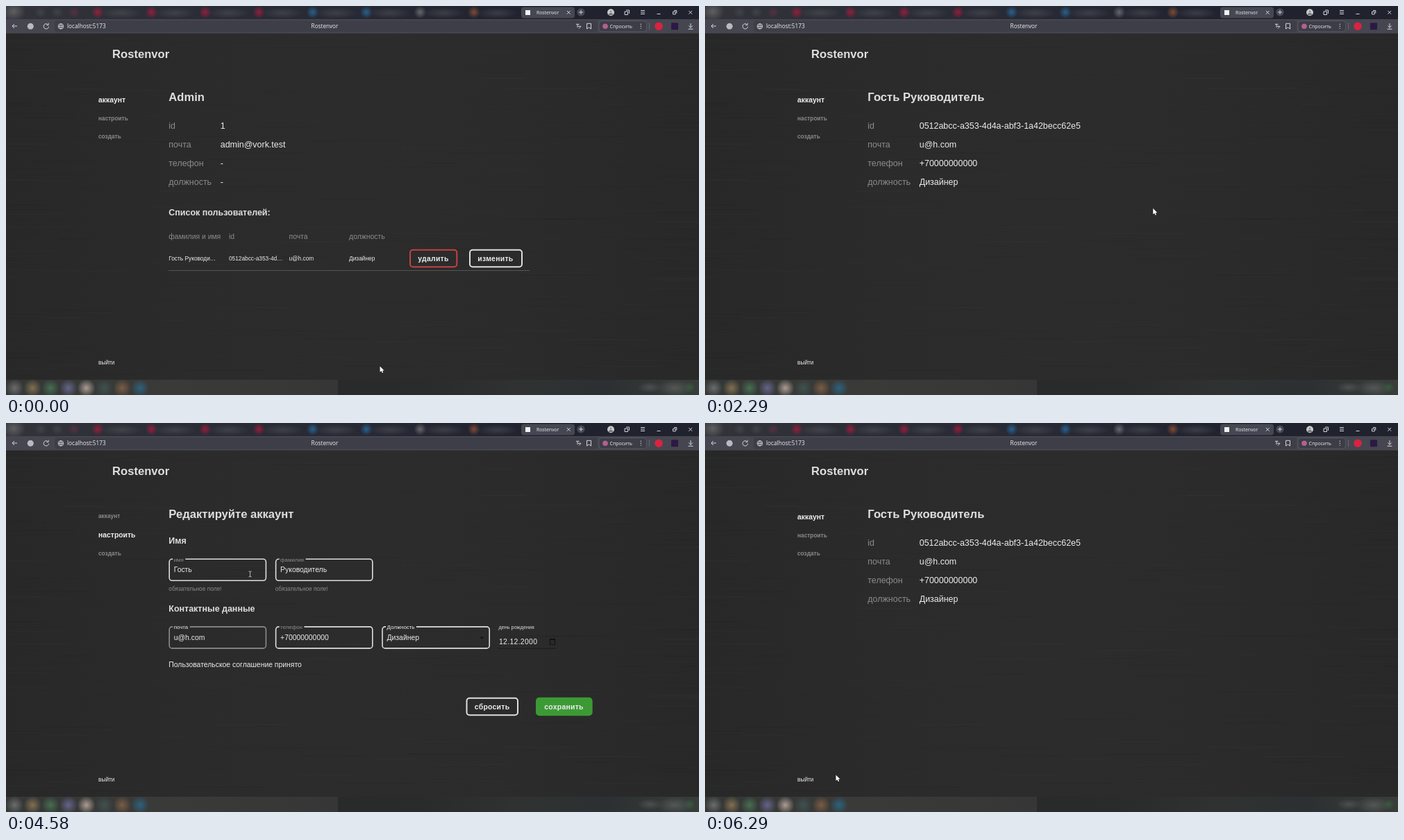
Animation of 998 by 561 pixels, one loop 6390 ms. Source, as an HTML page with a canvas:

```html
<!DOCTYPE html>
<html lang="ru">
<head>
<meta charset="utf-8">
<title>Rostenvor</title>
<style>
html, body { margin: 0; width: 100%; height: 100%; overflow: hidden; background: #2a2a2a; }
canvas { display: block; width: 998px; height: 561px; }
</style>
</head>
<body>
<canvas id="stage" width="998" height="561"></canvas>
<script>
const W = 998, H = 561, LOOP = 6390;
const ctx = document.getElementById('stage').getContext('2d');
const SANS = '"Liberation Sans", Arial, sans-serif';
const UI = '"Open Sans", "Noto Sans", sans-serif';

// Page type scale
const XS = 7.9, S = 8.32, M = 10.4, L = 12.47, XL = 16.63;
const LIGHT = '#dedede', WHITE = '#ececec', GREY = '#8c8c8c', GREEN = '#3c9a35', INK = '#111', ICON = '#d5d6da';
const COL = 234.3, STEP = 153.4;

const APP = 'Rostenvor', FIRST = 'Гость', LAST = 'Руководитель';
const MAIL = 'u@h.com', PHONE = '+70000000000', JOB = 'Дизайнер', ID = '0512abcc-a353-4d4a-abf3-1a42becc62e5';

// Page changes, ms
const LOGIN = 900, ACCOUNT = 2120, EDIT = 2804, AGAIN = 5204, BACK = 5560, FADE = 250;

// Pointer stops: time, x, y
const PATH = [
  [0, 538.5, 519.5], [560, 150, 516], [LOGIN, 150, 516], [1660, 672, 289], [1850, 724, 312], [2090, 724, 312],
  [2950, 154.5, 166.5], [3910, 781, 415], [4580, 352, 218], [AGAIN, 151, 162], [5370, 150, 145],
  [BACK, 149, 135], [6040, 316, 323], [6110, 316, 323], [6220, 157, 506], [6290, 188.5, 507.5], [LOOP, 188.5, 507.5]
];

const ramp = (t, a, b) => Math.min(1, Math.max(0, (t - a) / (b - a)));
const mix = (a, b, k) => a + (b - a) * k;

// Monotone cubic through the stops: the pointer rests wherever it turns
function slope(i, c) {
  if (i < 1 || i > PATH.length - 2) return 0;
  const rate = j => (PATH[j + 1][c] - PATH[j][c]) / (PATH[j + 1][0] - PATH[j][0]);
  const a = rate(i - 1), b = rate(i);
  return a * b > 0 ? 2 * a * b / (a + b) : 0;
}

function pointerAt(t) {
  const i = PATH.findIndex(p => p[0] > t) - 1;
  const p = PATH[i], q = PATH[i + 1], d = q[0] - p[0], u = (t - p[0]) / d, v = 1 - u;
  return [1, 2].map(c => v * v * (1 + 2 * u) * p[c] + u * u * (3 - 2 * u) * q[c]
    + d * u * v * (v * slope(i, c) - u * slope(i + 1, c)));
}

function text(g, str, x, y, size, color = LIGHT, o = {}) {
  g.font = `${o.bold ? 'bold ' : ''}${size}px ${o.font || SANS}`;
  g.textAlign = o.align || 'left';
  g.letterSpacing = (o.space || 0) + 'px';
  g.fillStyle = color;
  g.fillText(str, x, y);
  const width = g.measureText(str).width;
  g.letterSpacing = '0px';
  return width;
}
const bold = (str, x, y, size, color, o) => text(ctx, str, x, y, size, color, { bold: true, ...o });

function box(g, x, y, w, h, r, fill, stroke, lw = 1) {
  g.beginPath();
  g.roundRect(x, y, w, h, r);
  if (fill) { g.fillStyle = fill; g.fill(); }
  if (stroke) { g.strokeStyle = stroke; g.lineWidth = lw; g.stroke(); }
}

function dot(g, x, y, r, fill) {
  g.beginPath();
  g.arc(x, y, r, 0, 7);
  g.fillStyle = fill;
  g.fill();
}

// Line drawing around its own centre
function icon(g, x, y, d, color = ICON, lw = 1, fill) {
  const p = new Path2D(d);
  g.save();
  g.translate(x, y);
  g.strokeStyle = color;
  g.lineWidth = lw;
  g.stroke(p);
  if (fill) { g.fillStyle = fill; g.fill(p); }
  g.restore();
}

function blob(g, x, y, rx, ry, color, alpha) {
  g.save();
  g.translate(x, y);
  g.scale(rx, ry);
  const f = g.createRadialGradient(0, 0, 0, 0, 0, 1);
  f.addColorStop(0, color);
  f.addColorStop(0.5, color + '80');
  f.addColorStop(1, color + '00');
  g.globalAlpha = alpha;
  g.fillStyle = f;
  g.fillRect(-1, -1, 2, 2);
  g.restore();
}

// Horizontal band with evenly spaced colours
function band(g, x, y, w, h, colors) {
  const f = g.createLinearGradient(x, 0, x + w, 0);
  colors.forEach((c, i) => f.addColorStop(i / (colors.length - 1), c));
  g.fillStyle = f;
  g.fillRect(x, y, w, h);
}

function drawTabs(g) {
  band(g, 0, 0, W, 19, ['#33343a', '#2a2c36', '#272934', '#20222e', '#20222e']);
  blob(g, 11, 8, 17, 14, '#777777', 0.65);
  for (let i = 0; i < 3; i++) blob(g, 50 + i * 24, 9, 9, 8, `#${i < 2 ? '4d5558' : '7b304e'}`, 0.5);
  const red = '#a51c3b', blue = '#286b9e';
  [red, red, red, red, blue, blue, '#737377', '#8e5235'].forEach((c, i) => {
    const x = 132 + i * 77.4;
    blob(g, x + 34, 10, 30, 8, '#55565d', 0.5);
    blob(g, x, 9, 9, 9, c, 0.85);
  });
  box(g, 742, 1.5, 77, 16, 4, '#454752');
  box(g, 748, 6, 7, 7, 0, '#f2f2f2');
  text(g, APP, 764, 12, 6.8, '#f0f0f0', { font: UI });
  const cross = 'M-2.4-2.4L2.4 2.4M2.4-2.4L-2.4 2.4';
  icon(g, 810.3, 9.3, cross);
  dot(g, 828, 9, 5.7, '#454752');
  icon(g, 828, 9, 'M-3 0H3M0-3V3');
  dot(g, 871, 9.3, 5, '#c7c8cc');
  icon(g, 871, 9.3, 'M-2.5 3Q0-.5 2.5 3ZM-1-1.5H1', '#70727a', 1.4);
  icon(g, 894, 9, 'M-3-1H1.5V3.5H-3ZM-1-3H3.5V2');
  icon(g, 917, 9, 'M-3-2.5H3M-3 0H3M-3 2.5H3');
  icon(g, 940, 11.5, 'M-2.5 0H2.5');
  icon(g, 963, 9.3, 'M-2.5-1H1.2V2.6H-2.5ZM-1-2.8H2.8V1');
  icon(g, 985.7, 9.3, cross);
}

function drawAddress(g) {
  band(g, 0, 19, W, 20.5, ['#454650', '#454650']);
  box(g, 70, 21, 782, 16.5, 4, '#3d3e48');
  icon(g, 12.5, 29, 'M3.5 0H-3.5M-.5-3L-3.5 0L-.5 3');
  dot(g, 35.3, 29.3, 4.5, '#b9bac0');
  icon(g, 58, 29.3, 'M3.6 .4A3.7 3.7 0 1 1 2-3M3.4-4.6L3-1.8L.4-2');
  icon(g, 79, 29.3, 'M-3.8 0A3.8 3.8 0 1 1 3.8 0A3.8 3.8 0 1 1-3.8 0H3.8M0-3.8Q-3.2 0 0 3.8Q3.2 0 0-3.8', ICON, 0.9);
  const o = { font: UI };
  text(g, 'localhost:5173', 88, 32.2, 8.25, '#f0f0f2', o);
  text(g, APP, 459, 32.2, 8.2, '#f0f0f2', { font: UI, align: 'center' });
  icon(g, 824, 29.3, 'M-3-3H1.5M-1-3V1.7M0 0H4L1 3.2');
  icon(g, 839.5, 29.3, 'M-3-4H3V3.7L0 1.5L-3 3.7Z');
  box(g, 854, 21.5, 68.5, 15.5, 4, '#3c3d47', '#5d5e68', 0.8);
  dot(g, 863, 29.2, 3.8, '#b55f91');
  text(g, 'Спросить', 869.5, 31.8, 7, '#f0f0f2', o);
  for (let i = -1; i < 2; i++) dot(g, 914.3, 29.2 + i * 2.9, 0.7, ICON);
  icon(g, 926.5, 29, 'M0-5V5', '#656670');
  dot(g, 940, 29.2, 5.8, '#d92342');
  box(g, 958, 24.2, 10, 10, 1, '#2c1946');
  icon(g, 986, 29, 'M0-4V2.3M-2.8-.5L0 2.3L2.8-.5M-3.5 4.3H3.5');
}

function drawTaskbar(g) {
  band(g, 0, 539, 478, 22, ['#343736', '#3a3b38', '#363636']);
  band(g, 478, 539, W - 478, 22, ['#292a2a', '#2a2b2b', '#303232', '#2c3032', '#383d3a']);
  ['#7d7d7d', '#9c8259', '#4d8059', '#7472a6', '#d4bdb2', '#425958', '#916748', '#286f96']
    .forEach((c, i) => blob(g, 12.5 + i * 25.8, 551, 13, 13, c, 0.75));
  blob(g, 927, 550, 18, 8, '#666969', 0.5);
  blob(g, 963, 551, 26, 12, '#666b6b', 0.6);
  blob(g, 985, 550, 8, 8, '#347540', 0.5);
}

// Brushed texture, strongest at both sides
function drawTexture(g) {
  let seed = 7;
  const rnd = () => (seed = seed * 16807 % 2147483647) / 2147483647;
  for (let i = 0; i < 260; i++) {
    const edge = Math.pow(rnd(), 3) * W / 2;
    const x = rnd() < 0.5 ? edge - 50 : W - edge - 50;
    g.fillStyle = rnd() < 0.6 ? 'rgba(0,0,0,.06)' : 'rgba(255,255,255,.014)';
    g.fillRect(x, 40 + rnd() * 498, 30 + rnd() * 110, 0.6 + rnd());
  }
}

function makeBackdrop() {
  const c = document.createElement('canvas');
  c.width = W;
  c.height = H;
  const g = c.getContext('2d');
  band(g, 0, 0, W, H, ['#282828', '#2b2b2b', '#2c2c2c', '#2b2b2b', '#282828']);
  drawTexture(g);
  drawTaskbar(g);
  drawTabs(g);
  drawAddress(g);
  return c;
}

// Areas that change the pointer, collected while drawing
let areas = [];
const mark = (x, y, w, h, kind) => areas.push({ x, y, w, h, kind });

// Outlined input, its top edge open behind the label
function field(x, y, w, label, value, o = {}) {
  const h = 31, r = 4, inset = 6.5;
  const gap = x + inset + 2.5 + text(ctx, label, x + inset, y + 3.3 + (o.drop || 0), XS, o.tint || GREY);
  ctx.beginPath();
  ctx.moveTo(gap, y);
  ctx.arcTo(x + w, y, x + w, y + h, r);
  ctx.arcTo(x + w, y + h, x, y + h, r);
  ctx.arcTo(x, y + h, x, y, r);
  ctx.arcTo(x, y, x + w, y, r);
  ctx.lineTo(x + 5, y);
  ctx.strokeStyle = o.border || LIGHT;
  ctx.lineWidth = 1.6;
  ctx.stroke();
  text(ctx, value, x + inset, y + 18.9, M, WHITE);
  mark(x, y, w, h, 'beam');
}

function button(x, y, w, label, edge, fill, space = 0.28) {
  if (fill) box(ctx, x, y, w, 26.5, 5, fill);
  else box(ctx, x + 1, y + 1, w - 2, 24.5, 4, null, edge, 2);
  bold(label, x + 12.3, y + 17, M, WHITE, { space });
  mark(x, y, w, 26.5, 'hand');
}

// The active link is larger and brighter and pushes the next ones down
function nav(t) {
  const work = ramp(t, EDIT, EDIT + FADE), left = ramp(t, BACK, BACK + FADE);
  const make = ramp(t, 4950, 5100) - ramp(t, AGAIN, AGAIN + FADE);
  const grow = [1 - work + left, (work - left) * (1 - make), make * 0.7];
  let y = 133.7;
  ['аккаунт', 'настроить', 'создать'].forEach((name, i) => {
    const k = grow[i], c = mix(138, 236, k);
    y += 1.2 * k;
    bold(name, 133, y + mix(2.8, 3.6, k), mix(S, M, k), `rgb(${c},${c},${c})`);
    mark(133, y - 6, 52, 13, 'hand');
    y += 1.2 * k + 26.1;
  });
  text(ctx, 'выйти', 133, 517.4, S, WHITE);
  mark(133, 509, 26, 11, 'hand');
}

function profile(title, values) {
  bold(title, COL, 136.9, XL);
  ['id', 'почта', 'телефон', 'должность'].forEach((name, i) => {
    text(ctx, name, COL, 177.3 + i * 27, L, GREY);
    text(ctx, values[i], 308.7, 177.3 + i * 27, L, WHITE);
  });
}

function adminPage() {
  profile('Admin', ['1', 'admin@vork.test', '-', '-']);
  bold('Список пользователей:', COL, 301.8, L);
  const row = [FIRST + ' ' + LAST.slice(0, 8) + '…', ID.slice(0, 16) + '…', MAIL, JOB];
  ['фамилия и имя', 'id', 'почта', 'должность'].forEach((name, i) => {
    const x = COL + i * 86.6;
    text(ctx, name, x, 335.6, M, GREY);
    text(ctx, row[i], x, 366.8, S, WHITE);
  });
  button(581, 350.7, 69.3, 'удалить', '#c34242');
  button(667, 350.7, 77, 'изменить', LIGHT);
  icon(ctx, 234, 381.5, 'M0 0H520', '#555');
}

function loginPage(t) {
  const mid = { align: 'center' };
  bold(APP, W / 2, 75, XL, LIGHT, mid);
  bold('Войдите в аккаунт', W / 2, 139.8, XL, LIGHT, mid);
  field(246.2, 169.3, 505.5, 'почта', MAIL, { tint: WHITE });
  field(246.2, 234.8, 505.5, 'пароль', '');
  dot(ctx, 254.7, 250, 1.6, WHITE);
  if ((t + 500) % 1060 < 530) icon(ctx, 253, 184.5, 'M0-5.5V5.5', WHITE, 0.8);
  dot(ctx, 765, 249.5, 11.7, '#10a08c');
  button(696, 299.7, 56.7, 'войти', null, GREEN);
}

function editPage(t) {
  const shown = t < AGAIN ? EDIT : AGAIN, x = COL + 0.9, w = 139.2, low = 293.9;
  const drop = 13 * (1 - ramp(t, shown, shown + 200));
  bold('Редактируйте аккаунт', COL, 136.9, XL);
  bold('Имя', COL, 174.3, L);
  field(x, 196.3, w, 'имя', FIRST);
  field(x + STEP, 196.3, w, 'фамилия', LAST, { drop });
  for (let i = 0; i < 2; i++) text(ctx, 'обязательное поле!', COL + i * STEP, 241.6, S, GREY);

  bold('Контактные данные', COL, 271.8, L);
  field(x, low, w, 'почта', MAIL, { drop, tint: WHITE, border: GREY });
  field(x + STEP, low, w, 'телефон', PHONE, { drop });
  field(x + 2 * STEP, low, 154.2, 'Должность', JOB, { tint: WHITE });
  icon(ctx, 685.3, 309.5, 'M-2-.5H2L0 1.5Z', INK, 0.8, INK);
  text(ctx, 'день рождения', 709.5, 296.8, 7.28, LIGHT);
  text(ctx, '12.12.2000', 710, 319, M, WHITE, { space: 0.33 });
  icon(ctx, 787, 315.5, 'M-3.5-4H3.5V4H-3.5ZM-3.5-3H3.5', INK, 1.1);
  icon(ctx, 709, 325.3, 'M0 0H83', '#1b1b1b');
  text(ctx, 'Пользовательское соглашение принято', COL, 351.8, M, WHITE);

  // Buttons widen under the pointer, anchored at the right
  const hover = (a, b) => ramp(t, a, a + 200) - ramp(t, b, b + 200);
  const reset = hover(3640, 3860), save = hover(3880, 4130);
  const right = 844.6, saveW = 81.6 + 4.5 * save, resetW = 75.5 + 4 * reset;
  button(right - saveW - 25 - resetW, 395.8, resetW, 'сбросить', LIGHT, null, 0.28 + 0.5 * reset);
  button(right - saveW, 395.8, saveW, 'сохранить', null, GREEN, 0.28 + 0.5 * save);
}

function pointer(t) {
  const [x, y] = pointerAt(t);
  const hit = areas.find(a => x >= a.x && x <= a.x + a.w && y >= a.y && y <= a.y + a.h);
  const kind = hit ? hit.kind : 'arrow';
  if (kind === 'beam') icon(ctx, x, y, 'M-2-4L0-3.5L2-4M0-3.5V3.5M-2 4L0 3.5L2 4', '#c9c9c9', 0.9);
  else if (kind === 'hand') {
    icon(ctx, x, y, 'M-1 .8Q0-.6 1 .8V4L4.4 4.8Q5.4 5.2 5.2 6.6L4.2 10.5H-.4L-3.4 6.8Q-3.2 5.4-1.9 6.2L-1 7Z', INK, 1, '#fff');
  } else icon(ctx, x, y, 'M0 0V8.6L2 6.8L3.4 9.8L4.8 9.1L3.5 6.3H6.2Z', INK, 1, '#fff');
}

const backdrop = makeBackdrop();

function draw(t) {
  areas = [];
  ctx.drawImage(backdrop, 0, 0);
  if (t >= LOGIN && t < ACCOUNT) loginPage(t);
  else {
    bold(APP, 153, 75, XL);
    nav(t);
    if (t < LOGIN) adminPage();
    else if (t >= EDIT && t < BACK) editPage(t);
    else profile(FIRST + ' ' + LAST, [ID, MAIL, PHONE, JOB]);
  }
  if ((t > EDIT && t < 3250) || (t > AGAIN && t < 5440)) {
    box(ctx, 0, 529, 73.5, 10.5, [0, 2, 0, 0], '#ececec');
    text(ctx, 'localhost:5173/user/edit', 4, 536.6, 6.2, '#333', { font: UI });
  }
  pointer(t);
}

const start = performance.now();
function tick() {
  draw((performance.now() - start) % LOOP);
  requestAnimationFrame(tick);
}
tick();
</script>
</body>
</html>
```
